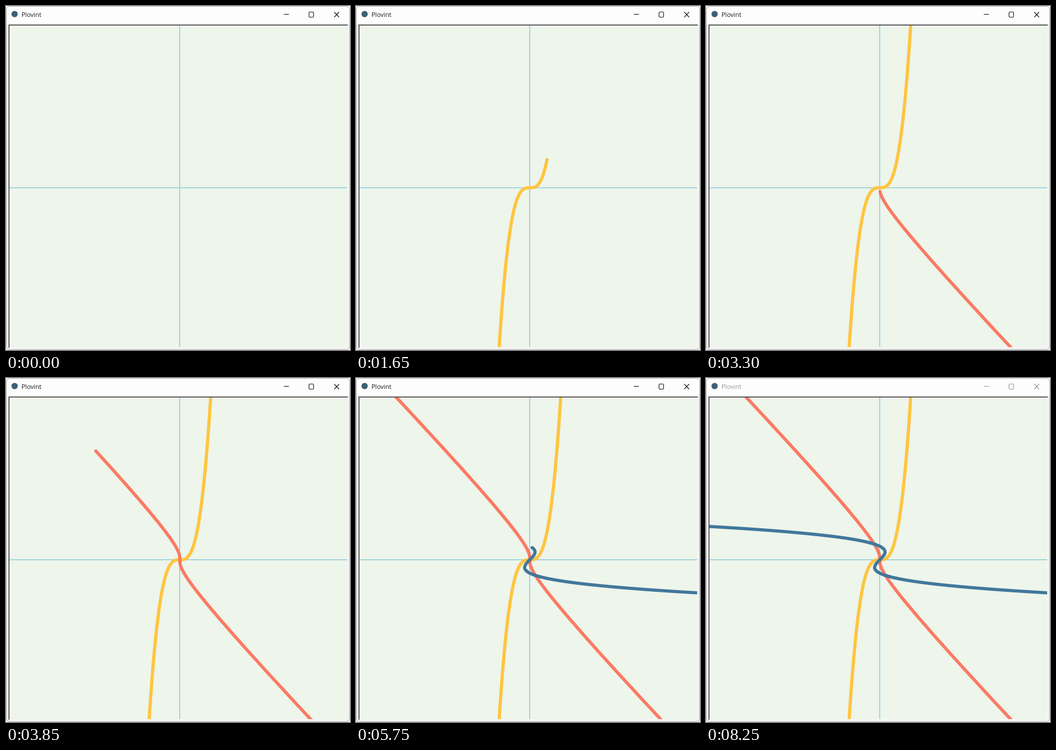
Recreate the animation shown at these times as an HTML page with a canvas. Size 600 by 600 pixels, loop 8450 ms.

```html
<!DOCTYPE html>
<html lang="en">
<head>
<meta charset="utf-8">
<title>Curve plotter</title>
<style>
  html, body { margin: 0; width: 100%; height: 100%; overflow: hidden; background: #f0f0f0; }
  canvas { display: block; width: 600px; height: 600px; }
</style>
</head>
<body>
<canvas id="stage" width="600" height="600"></canvas>
<script>
const ctx = document.getElementById('stage').getContext('2d');

const LOOP = 8450;
const STEP = 50;        // the picture advances in 50 ms ticks
const RANGE = 65;       // each curve runs from -RANGE to RANGE
const SPEED = 0.09;     // parameter units per ms
const BLUR_AT = 7000;   // the window loses focus
const ORIGIN = { x: 303.2, y: 317 };

const cube = t => t ** 3 / 550;

// One cubic and two linear maps of it; mid is when t crosses zero.
const curves = [
  { color: '#ffc53f', mid: 1317, at: t => [t, -cube(t)] },
  { color: '#fb7a64', mid: 3370, at: t => [-cube(t), -cube(t) - t] },
  { color: '#42779b', mid: 5517, at: t => [t - cube(t), -t] }
];

function rect(x, y, w, h, color) {
  ctx.fillStyle = color;
  ctx.fillRect(x, y, w, h);
}

function line(x1, y1, x2, y2) {
  ctx.beginPath();
  ctx.moveTo(x1, y1);
  ctx.lineTo(x2, y2);
  ctx.stroke();
}

function drawTitleBar(ink) {
  rect(1, 1, 598, 29, '#fdfdfd');

  ctx.fillStyle = '#3d5f74';
  ctx.beginPath();
  ctx.arc(15, 14, 5.5, 0, Math.PI * 2);
  ctx.fill();

  ctx.fillStyle = ink;
  ctx.font = '11px "Open Sans", "Noto Sans", sans-serif';
  ctx.fillText('Plovint', 27, 19);

  ctx.strokeStyle = ink;
  ctx.lineWidth = 1.1;
  line(484.5, 14.5, 493.5, 14.5);
  ctx.beginPath();
  ctx.roundRect(528.5, 10.5, 8, 9, 1.5);
  ctx.stroke();
  line(572.5, 10.5, 581, 19.5);
  line(581, 10.5, 572.5, 19.5);
}

function drawWindow(active) {
  rect(0, 0, 600, 600, '#f0f0f0');
  drawTitleBar(active ? '#1b1b1b' : '#999999');

  // sunken frame around the plot
  rect(4, 32, 592, 564, '#a0a0a0');
  rect(5, 33, 591, 563, '#303330');
  rect(6, 595, 590, 1, '#fafafa');
  rect(595, 34, 1, 562, '#fafafa');
  rect(6, 34, 589, 561, '#eef5eb');

  ctx.strokeStyle = active ? '#b4b4b4' : '#bebebe';
  ctx.lineWidth = 1;
  ctx.beginPath();
  ctx.roundRect(0.5, 0.5, 599, 599, 7);
  ctx.stroke();
}

function drawCurve({ color, mid, at }, time) {
  const end = Math.min(RANGE, (time - mid) * SPEED);
  if (end <= -RANGE) return;
  ctx.strokeStyle = color;
  ctx.lineWidth = 5.6;
  ctx.lineCap = ctx.lineJoin = 'round';
  ctx.beginPath();
  for (let t = -RANGE; t < end; t++) ctx.lineTo(...at(t));
  ctx.lineTo(...at(end));
  ctx.stroke();
}

function drawPlot(time) {
  ctx.save();
  ctx.beginPath();
  ctx.rect(6, 34, 589, 561);
  ctx.clip();
  rect(302, 34, 2, 561, '#a6d6dc');
  rect(6, 316, 589, 2, '#a6d6dc');
  ctx.translate(ORIGIN.x, ORIGIN.y);
  curves.forEach(curve => drawCurve(curve, time));
  ctx.restore();
}

function render(now) {
  const time = Math.floor((now % LOOP) / STEP) * STEP;
  drawWindow(time < BLUR_AT);
  drawPlot(time);
}

const start = performance.now();
function tick() {
  render(performance.now() - start);
  requestAnimationFrame(tick);
}
tick();
</script>
</body>
</html>
```
